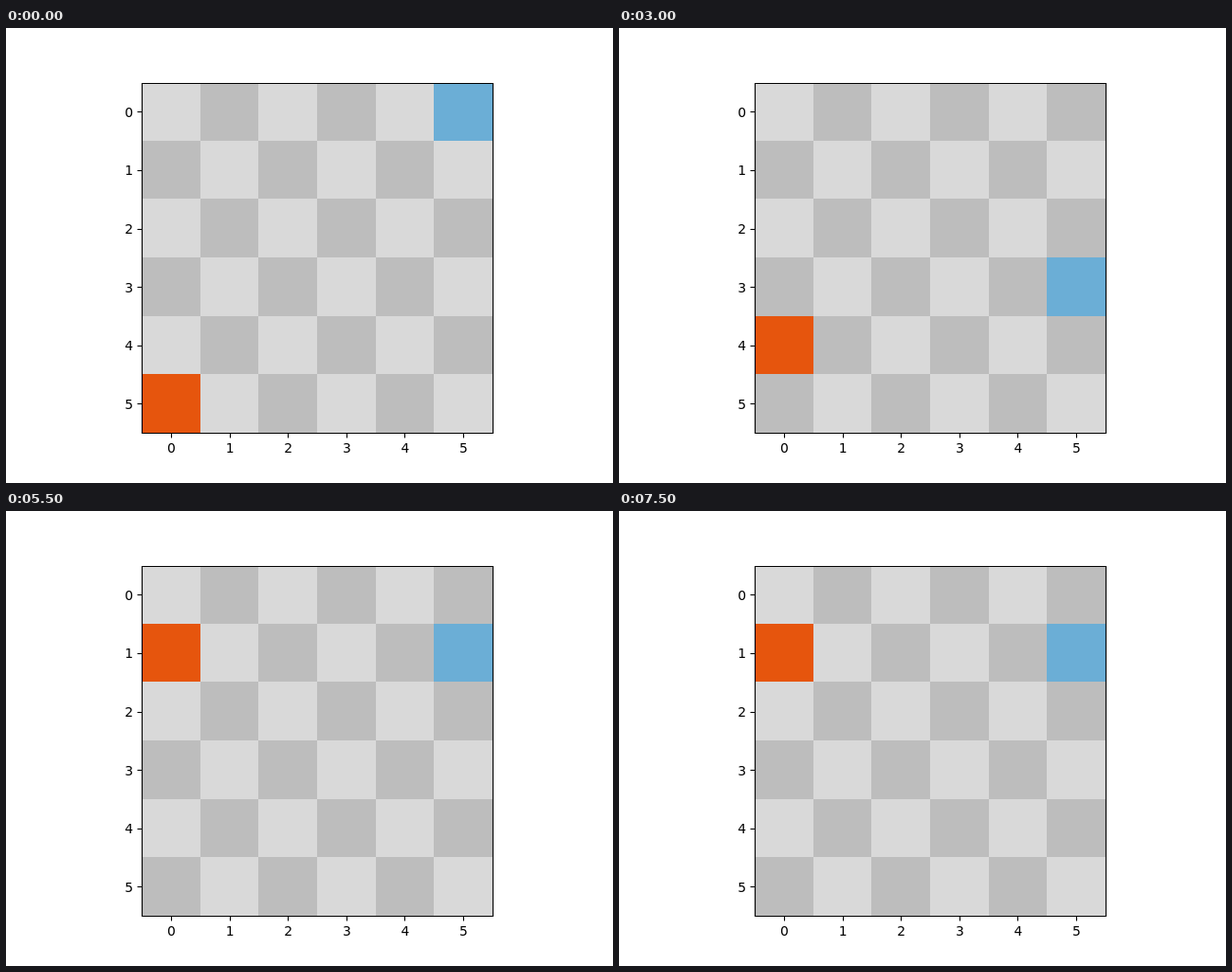
These frames come from a looping animation (640x480 px, 8 s). An HTML page:

```html
<!DOCTYPE html>
<html lang="en">
<head>
<meta charset="utf-8">
<title>Two walkers on a grid</title>
<style>
  html, body { margin: 0; width: 100%; height: 100%; overflow: hidden; background: #fff; }
  svg { display: block; width: 640px; height: 480px; }
  text { font: 13.889px "DejaVu Sans", sans-serif; }
</style>
</head>
<body>
<svg id="stage" viewBox="0 0 640 480"></svg>
<script>
const STEP = 500;
const SIZE = 6;
const xEdges = [143, 205, 266, 328, 390, 451, 513];
const yEdges = [58, 119, 180, 242, 304, 365, 427];

// The walkers take turns; each entry is a [row, column] stop.
const orangeStops = [[5, 0], [5, 1], [5, 0], [4, 0], [3, 0], [2, 0], [1, 0], [2, 0], [1, 0]];
const blueStops = [0, 1, 2, 3, 2, 1, 2, 1].map(row => [row, 5]);
const LOOP = 16 * STEP;

const stage = document.getElementById('stage');

function add(tag, attributes, content = '') {
  const node = document.createElementNS('http://www.w3.org/2000/svg', tag);
  for (const name in attributes) node.setAttribute(name, attributes[name]);
  node.textContent = content;
  return stage.appendChild(node);
}

function place(rect, [row, column]) {
  rect.setAttribute('x', xEdges[column]);
  rect.setAttribute('y', yEdges[row]);
  rect.setAttribute('width', xEdges[column + 1] - xEdges[column]);
  rect.setAttribute('height', yEdges[row + 1] - yEdges[row]);
}

function addCell(fill, stop) {
  const rect = add('rect', { fill, 'shape-rendering': 'crispEdges' });
  place(rect, stop);
  return rect;
}

function addLine(d) {
  add('path', { d, fill: 'none', stroke: '#000', 'stroke-width': 1.11 });
}

for (let row = 0; row < SIZE; row++) {
  for (let column = 0; column < SIZE; column++) {
    addCell((row + column) % 2 ? '#bdbdbd' : '#d9d9d9', [row, column]);
  }
}

const orange = addCell('#e6550d', orangeStops[0]);
const blue = addCell('#6baed6', blueStops[0]);

addLine('M143.5 58.5H513.5V427.5H143.5Z');
for (let i = 0; i < SIZE; i++) {
  const x = 174 + 61.6 * i;
  const y = 88.4 + 61.6 * i;
  addLine(`M${Math.round(x) + 0.5} 427.5v5`);
  addLine(`M143.5 ${Math.round(y) + 0.5}h-5`);
  add('text', { x: x + 0.5, y: 448, 'text-anchor': 'middle' }, i);
  add('text', { x: 134, y: Math.round(y + 5.3), 'text-anchor': 'end' }, i);
}

function render(time) {
  const turn = Math.floor((time % LOOP) / STEP);
  place(orange, orangeStops[Math.ceil(turn / 2)]);
  place(blue, blueStops[Math.floor(turn / 2)]);
}

const start = performance.now();
function tick() {
  render(performance.now() - start);
  requestAnimationFrame(tick);
}
tick();
</script>
</body>
</html>
```
